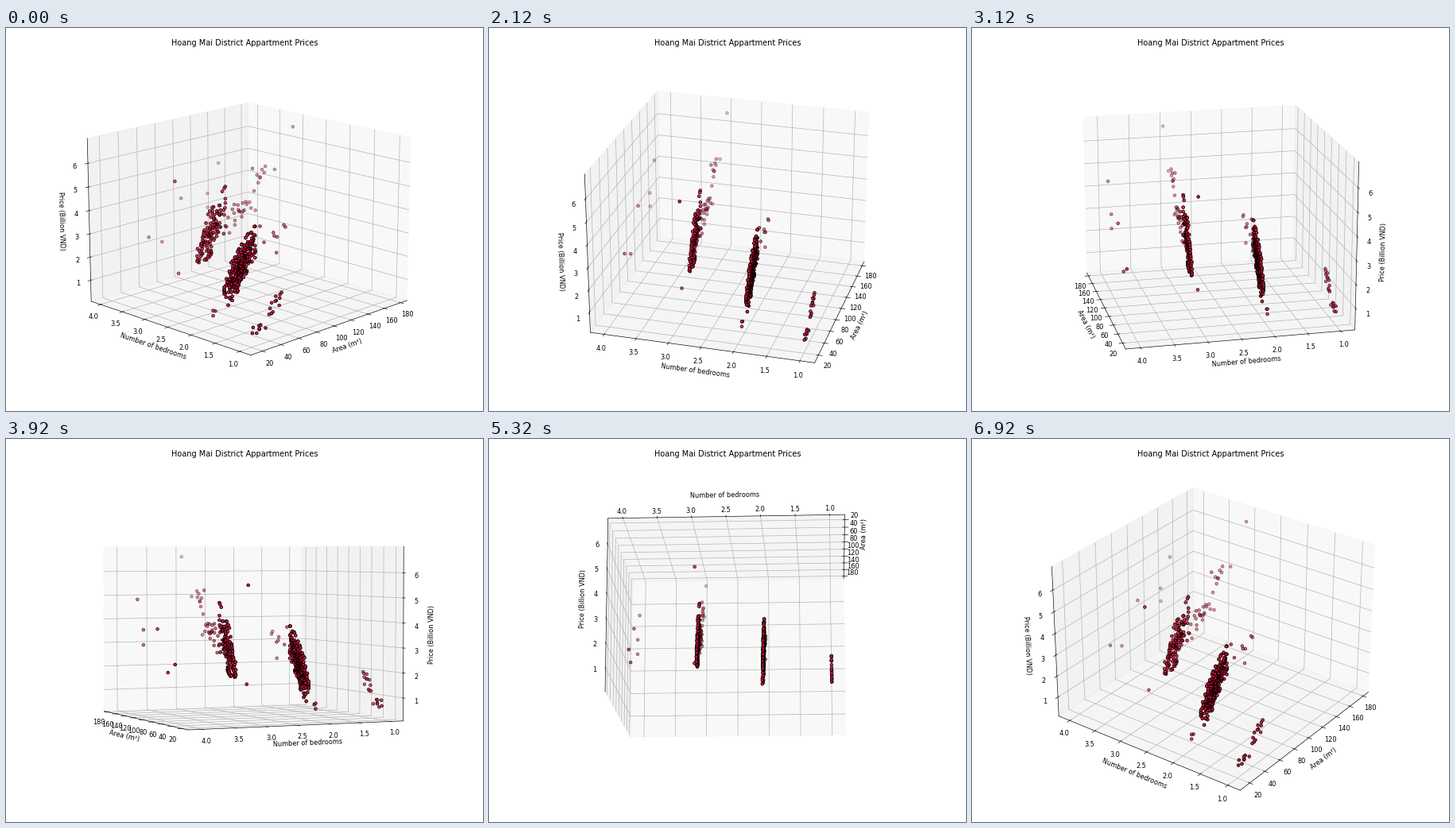
A matplotlib script that plays this animation: 600x482 px, repeating every 7 s.

```python
import numpy as np
import matplotlib.pyplot as plt
from matplotlib.animation import FuncAnimation

W, H, DPI = 600, 482, 58.59375
FRAMES, INTERVAL = 70, 100
rng = np.random.default_rng(8)


def noise(n):
    return np.clip(rng.normal(size=n), -2, 2)


def cluster(beds, n, area, spread, price, slope=0.0, scatter=0.3, floor=0.55, copies=1):
    """Flats whose price grows with their area; repeated listings overlap."""
    dev = spread * noise(n)
    p = price + slope * dev + scatter * noise(n)
    p = floor + np.abs(p - floor)
    flats = np.column_stack((area + dev, np.full(n, beds), p))
    return np.repeat(flats, copies, axis=0)


# Lone flats: area, bedrooms, price
lone = np.array([
    (141, 4, 4.87), (128, 4, 3.64), (128, 4, 3.02), (97.5, 4, 3.73),
    (75.6, 4, 2.04), (61, 4, 2.4),
    (176, 3, 6.62), (41.5, 3, 5.52), (44.4, 3, 1.6),
])
points = np.vstack((
    lone,
    cluster(1, 12, 47, 4, 1.6, slope=0.05, scatter=0.2),
    cluster(1, 8, 29, 4, 0.75, scatter=0.08),
    cluster(2, 260, 60.5, 8.5, 2.25, slope=0.052, scatter=0.42, copies=2),
    cluster(2, 8, 104, 12, 3.2, scatter=0.5),
    cluster(2, 3, 32, 2, 0.9, scatter=0.2),
    cluster(3, 125, 81, 8, 3.0, slope=0.05, scatter=0.48, floor=1.8, copies=2),
    cluster(3, 24, 115, 10, 3.75, slope=0.02, scatter=0.45),
    cluster(3, 8, 145, 11, 4.85, scatter=0.25),
))

# Camera path: frame, azimuth, elevation
path = np.array([
    (6, -135.5, 16), (13, -144.1, 19), (21, -164.4, 25),
    (31, -193, 17.5), (39, -204.3, 2.4), (46, -202, -11),
    (53, -177, -14), (62, -149, 11), (69, -143.5, 29),
])
knots, poses = path[:, 0], path[:, 1:]
tangents = np.gradient(poses, knots, axis=0)


def camera(k):
    """Smooth Hermite interpolation of the path, still at the start."""
    k = max(k, knots[0])
    i = min(np.searchsorted(knots, k, side="right") - 1, len(knots) - 2)
    span = knots[i + 1] - knots[i]
    t = (k - knots[i]) / span
    return ((2 * t**3 - 3 * t**2 + 1) * poses[i]
            + (t**3 - 2 * t**2 + t) * span * tangents[i]
            + (3 * t**2 - 2 * t**3) * poses[i + 1]
            + (t**3 - t**2) * span * tangents[i + 1])


fig = plt.figure(figsize=((W + 1e-6) / DPI, (H + 1e-6) / DPI), dpi=DPI)
fig.text(0.5, 1 - 22.3 / H, "Hoang Mai District Appartment Prices",
         ha="center", va="baseline", size=12)
ax = fig.add_axes((79 / W, 12.9 / H, 442 / W, 442 / H), projection="3d")
ax.scatter(*points.T, c="crimson", edgecolors="black", s=20)
ax.set(xlim=(7.5, 188), ylim=(0.78125, 4.21875), zlim=(0.08, 7.05),
       xlabel="Area (m²)", ylabel="Number of bedrooms",
       zlabel="Price (Billion VND)")
ax.set_xticks(range(20, 181, 20))
ax.set_yticks(np.arange(1, 4.1, 0.5))
ax.set_zticks(range(1, 7))


def draw(k):
    azim, elev = camera(k)
    ax.view_init(elev=elev, azim=azim)
    return []


anim = FuncAnimation(fig, draw, frames=FRAMES, interval=INTERVAL,
                     repeat=True, repeat_delay=0, blit=False)
plt.show()
```
